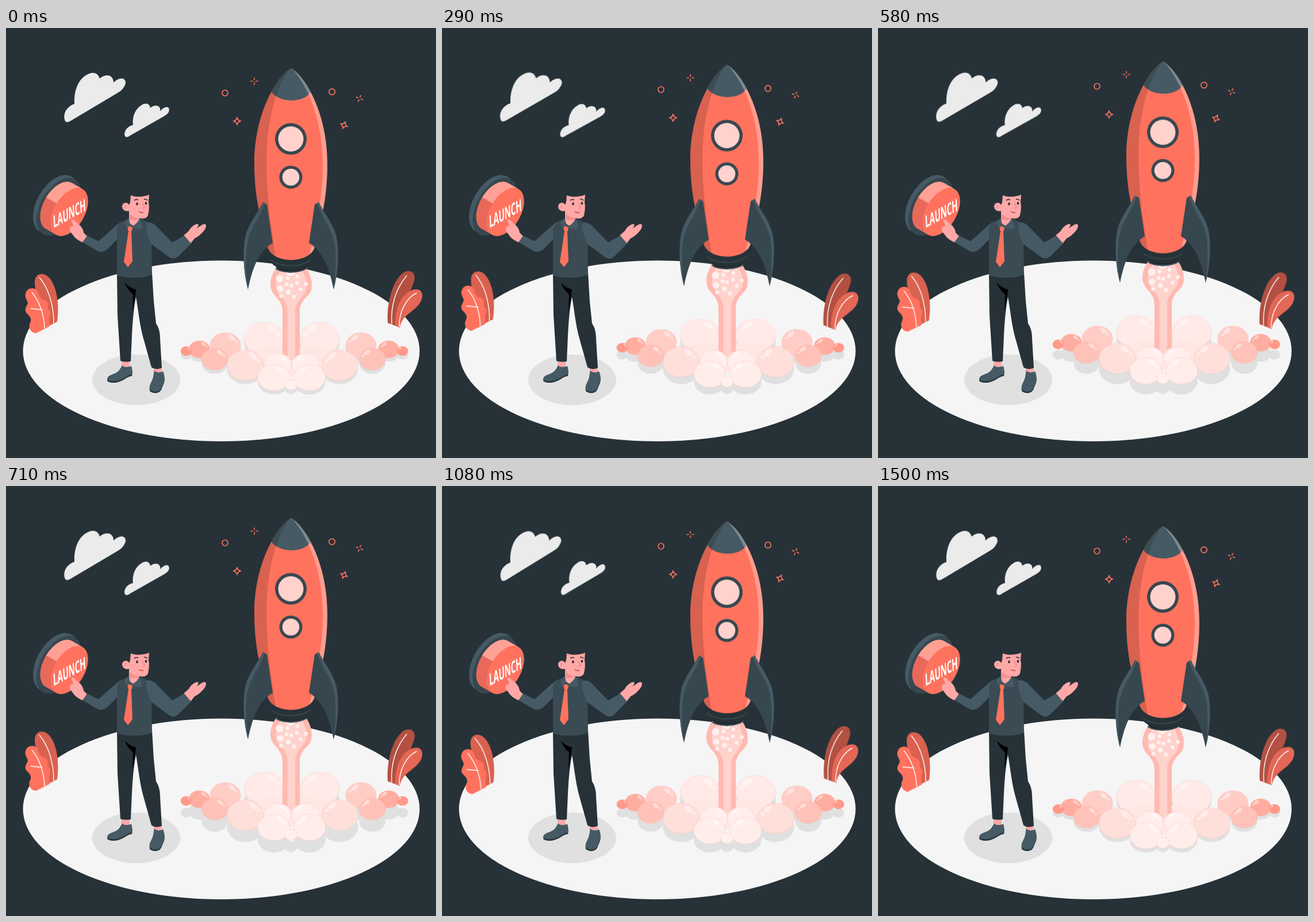
An HTML page that plays this animation: 748x748 px, repeating every 1540 ms.

```html
<!DOCTYPE html>
<html lang="en">
<head>
<meta charset="utf-8">
<title>Rocket launch</title>
<style>
  html, body { margin: 0; width: 100%; height: 100%; overflow: hidden; background: #263238; }
  svg { display: block; width: 100%; height: 100%; }
  .fly, .sway { animation: fly 1540ms -5ms infinite; }
  .sway { animation-name: sway; }
  .clouds { transform-origin: 193px 134px; }
  .plants { transform-origin: 379px 477px; }
  @keyframes fly {
    0% { transform: translateY(0); animation-timing-function: steps(18); }
    48.649% { transform: translateY(-14.96px); animation-timing-function: steps(18); }
    97.297%, 100% { transform: translateY(0); }
  }
  @keyframes sway {
    0% { transform: rotate(0deg); animation-timing-function: steps(9); }
    24.324% { transform: rotate(1deg); animation-timing-function: steps(18); }
    72.973% { transform: rotate(-1deg); animation-timing-function: steps(10); }
    100% { transform: rotate(0deg); }
  }
  .red { fill: #ff725e; }
  .skin { fill: #ffa8a7; }
  .slate { fill: #455a64; }
  .deep { fill: #37474f; }
  .dark { fill: #263238; }
  .line { fill: none; stroke: #ff725e; stroke-width: 1.7; stroke-linejoin: round; stroke-linecap: round; }
  .rib { fill: none; stroke: #fff; stroke-width: 1.4; stroke-linecap: round; }
  text { font: bold 29px "Open Sans", sans-serif; fill: #fff; }
</style>
</head>
<body>
<svg viewBox="0 0 748 748">
  <defs>
    <path id="body" d="M496 70C470 85 432 150 432 235C432 285 440 320 446 340L456 384C468 410 524 410 536 384L546 340C552 318 559 285 559 235C559 150 522 85 496 70Z"/>
    <clipPath id="hull"><use href="#body"/></clipPath>
    <path id="shoes" d="M202 587C206 591 213 590 218 588C220 594 220 599 219 603C212 603 206 610 199 612C190 616 178 615 176 611C176 604 186 603 191 600C197 597 199 592 202 587ZM258 596C262 600 269 600 273 597C276 604 277 611 274 617L270 627C266 634 255 634 250 629C248 621 255 614 256 607Z"/>
    <path id="spark" d="M0-5.500V-2.500M0 2.500V5.500M-6 0H-3M3 0H6"/>
    <path id="star" d="M0-6.500Q1-1 6.500 0Q1 1 0 6.500Q-1 1-6.500 0Q-1-1 0-6.500Z"/>
  </defs>
  <rect width="748" height="748" class="dark"/>
  <ellipse cx="374.5" cy="561.8" rx="345" ry="157.2" fill="#f5f5f5"/>
  <ellipse cx="226.5" cy="612" rx="76.5" ry="44" fill="#e0e0e0"/>
  <g id="shade" fill="#e0e0e0"></g>

  <g class="sway clouds" fill="#ebebeb">
    <path d="M103 162C100 156 101 147 106 141C110 136 115 133 119 132C118 112 124 90 141 81C152 75 160 78 163 88C168 83 176 81 182 84C186 87 187 91 187 95C192 90 198 87 203 88C209 90 209 96 206 101C203 107 199 110 194 113L115 160C109 164 105 165 103 162Z"/>
    <path d="M207 188C205 184 207 178 211 174C214 171 218 169 221 169C219 156 224 141 236 134C244 129 250 132 251 139C256 135 263 133 267 138C268 140 269 142 268 145C272 140 278 136 282 138C285 141 284 146 281 149C279 151 277 152 274 154L216 187C212 190 209 191 207 188Z"/>
  </g>

  <g class="sway plants">
    <path fill="#d9614f" d="M67 522C70 490 49 465 50 441C51 428 61 425 70 430C87 441 94 478 89 511Z"/>
    <path class="rib" d="M58 434C72 450 83 478 83 513"/>
    <path class="red" d="M52 531C44 530 39 524 41 515C46 506 42 502 36 496C30 489 37 484 38 478C36 471 31 468 35 459C39 451 51 451 55 458C57 467 60 471 66 473C75 476 72 483 73 489C81 495 75 501 75 507L76 519Z"/>
    <path class="rib" d="M45 460C57 474 66 496 67 522M43 488L63 490"/>
    <path fill="#b35042" d="M664 513C662 480 671 440 692 425C703 419 714 425 710 440C704 461 688 487 685 521Z"/>
    <path class="rib" d="M697 431C678 453 669 483 671 515"/>
    <path fill="#e56755" d="M685 521C690 494 720 492 724 468C726 455 714 451 702 458C685 467 677 490 677 517Z"/>
    <path class="rib" d="M714 461C696 470 684 493 684 519"/>
  </g>

  <g class="button">
    <ellipse class="slate" rx="32" ry="55" transform="translate(86 306) rotate(30)"/>
    <ellipse class="deep" rx="32" ry="55" transform="translate(92 311) rotate(30)"/>
    <g transform="translate(92 309.5) rotate(30)">
      <path fill="#e8695a" d="M0-46H21V46H0A26.7 46 0 0 1 0-46Z"/>
      <path fill="#ffa195" d="M0-46H21V-2H-26.7A26.7 46 0 0 1 0-46Z"/>
      <ellipse class="red" cx="21" rx="26.7" ry="46"/>
    </g>
    <text transform="matrix(.46 -.25 .05 1 82.5 348)">LAUNCH</text>
  </g>

  <g class="man">
    <path class="skin" d="M201 577H215V592H201ZM256 586H271V602H257Z"/>
    <use href="#shoes" class="dark" y="2.5"/>
    <use href="#shoes" class="slate"/>
    <path class="dark" d="M193 425H254L257 475L261 514C266 521 268 530 268 540L271 591C266 594 258 594 253 590L239 540C232 515 230 488 226 468C221 493 220 519 219 535L217 580C210 581 204 581 199 579L194 500Z"/>
    <path d="M207 443C212 449 218 452 226 455L224 472L220 494L221 463C214 458 209 450 207 443Z"/>
    <path class="skin" d="M141 362L135 356C134 349 131 345 126 341L118 334C115 332 112 334 115 338L117 344L112 346C109 350 111 354 115 358C120 366 125 369 133 373ZM309 361L318 353C321 347 328 341 333 341C337 342 333 347 331 349C336 346 341 341 346 341C350 343 347 350 344 353C339 359 333 364 328 366L321 375Z"/>
    <path class="slate" d="M207 336C200 336 195 341 190 345L161 371L141 361L134 373L159 388C165 391 171 389 176 385L198 363Z"/>
    <path fill="#3a4b54" d="M213 334C201 336 193 342 193 354V430C206 436 240 436 254 429L253 365L247 338L236 333Z"/>
    <path class="slate" d="M243 340C250 336 256 339 261 344L289 373L310 361L322 375L301 396C295 403 288 402 283 398L253 376C247 365 244 352 243 340Z"/>
    <path class="skin" d="M217 291C227 295 240 294 249 290L248 303C250 312 248 321 247 326C244 332 238 332 232 331V340C226 347 217 344 214 337V318C209 320 202 317 202 310C203 303 212 302 214 308L216 303Z"/>
    <path fill="#f28f8f" d="M215 323C220 328 226 331 232 331C227 335 220 335 215 333Z"/>
    <path class="slate" d="M214 331C215 339 217 344 214 353C209 348 206 341 206 336ZM232 331C235 335 237 341 237 349C230 351 222 348 217 346C224 343 230 338 232 331Z"/>
    <path class="red" d="M212 346C215 344 218 345 220 348L219 353C217 355 214 355 212 352ZM213 354H218L220 406L212 416L205 407Z"/>
    <g class="dark"><ellipse cx="228" cy="306" rx="1.8" ry="2.4"/><ellipse cx="243.5" cy="305" rx="1.8" ry="2.4"/></g>
    <path fill="none" stroke="#263238" stroke-width="1.6" d="M223 300Q226 297 230 299M240 298Q244 297 246 300"/>
    <path fill="none" stroke="#e27f80" stroke-width="1.2" d="M237 304L241 312Q240 314 237 313M207 308Q210 311 206 313"/>
    <path fill="none" stroke="#b53f42" stroke-width="1.3" d="M231 319Q235 322 239 321"/>
  </g>

  <g class="fly">
    <g class="line">
      <circle cx="381" cy="113" r="5"/>
      <circle cx="567" cy="111" r="5.2"/>
      <use href="#spark" transform="translate(432 92.5)"/>
      <use href="#spark" transform="translate(615 122.5) rotate(22)"/>
      <use href="#star" transform="translate(402 162)"/>
      <use href="#star" transform="translate(588 169) rotate(22)"/>
    </g>
    <g id="back"></g>
    <path fill="#ffb9b0" d="M472 415C462 426 457 445 462 456C466 468 480 472 481 492V578H511V492C512 472 527 468 531 456C534 445 530 426 520 415Z"/>
    <path fill="#ffd2cc" d="M482 418C469 430 467 448 472 459C477 468 489 474 489.5 492V578H503V492C504 474 518 467 522 456C525 444 520 426 512 418Z"/>
    <g id="bubbles" fill="#fff0ee"></g>
    <g id="front"></g>

    <path fill="#202b30" d="M468 410C468 431 525 431 526 409Z"/>
    <path class="dark" d="M459 393L462 409C474 424 519 424 529 409L531 393Z"/>
    <path fill="none" stroke="#37474f" stroke-width="2" d="M461 403C474 417 518 417 530 402M469 418C480 427 515 426 525 416"/>
    <use href="#body" class="red"/>
    <g clip-path="url(#hull)">
      <path class="slate" d="M440 60H550V111H530C519 131 474 131 461 110Z"/>
      <path fill-opacity=".15" d="M496 68C472 98 453 155 453 237C453 290 462 355 471 410H420V68Z"/>
      <path fill="#fff" fill-opacity=".3" d="M496 69C523 98 551 155 551 240C551 295 538 355 524 410H570V69Z"/>
    </g>
    <g class="deep">
      <circle cx="495.5" cy="193" r="27.5"/>
      <circle cx="495.5" cy="259.5" r="20"/>
    </g>
    <g fill="#ffd2cd">
      <circle cx="495.5" cy="193" r="22"/>
      <circle cx="495.5" cy="259.5" r="14.8"/>
    </g>
    <g id="fin">
      <path class="deep" d="M447 303L454 307L464 374C439 388 428 420 421 455C413 425 411 385 417 360C423 339 439 320 447 303Z"/>
      <path class="slate" d="M447 303L450 305C442 329 427 345 421 368C416 390 417 420 420 450C413 425 411 385 417 360C423 339 439 320 447 303Z"/>
    </g>
    <use href="#fin" transform="translate(991) scale(-1 1)"/>
  </g>
</svg>
<script>
  const MID = 496;
  const put = (id, html) => document.getElementById(id).innerHTML = html;
  const range = n => [...Array(n).keys()];
  const oval = (x, y, rx, ry, attrs = '') =>
    `<ellipse cx="${x}" cy="${y}" rx="${rx}" ry="${ry}" ${attrs}/>`;

  // Puffs on both sides of the exhaust; the right half spreads a little wider.
  const pair = (d, y, r) => [-1, 1].map(side => ({ side, d, x: MID + side * d + d * .03, y, r }));
  const back = range(4).flatMap(k =>
    pair(48 + 81.5 * k - 11.6 * k * k, 541 + 13 * k - 2 * k * k, 35 - 8.4 * k));
  const front = range(3).flatMap(k =>
    pair(31 + 49 * k + 2 * k * k, 608 - 27 * k + 5.5 * k * k, 28 + 10.5 * k - 6.5 * k * k)).reverse();
  const inner = pair(24, 586, 24);
  const tip = { side: 1, d: 0, x: MID, y: 621, r: 11 };

  // Puffs redden with distance from the exhaust.
  function puff({ side, d, x, y, r }) {
    const tone = `hsl(8 100% ${96.5 - 20 * (d / 190) ** 2}%)`;
    const shine = (u, v, w, h) => oval(0, 0, r * w, r * h,
      `fill="#fff" fill-opacity=".45" transform="translate(${x - side * r * u} ${y - r * v}) rotate(${-side * 38})"`);
    return oval(x, y, r, r * .83, `fill="${tone}" stroke="#ff9c8e" stroke-opacity=".3" stroke-width=".8"`)
      + shine(.4, .5, .26, .14) + shine(.7, .25, .1, .08);
  }

  const base = oval(MID, 580, 110, 26, 'fill="#ffe8e4"');
  const [outer, near] = [front.slice(0, 4), front.slice(4)];
  put('back', back.map(puff).join('') + base);
  put('front', [...outer, ...inner, ...near, tip].map(puff).join(''));
  put('shade', [...back, ...front, tip].map(p => oval(p.x, p.y + 6.5, p.r, p.r * .83)).join(''));

  // Bubbles on a golden-angle spiral, larger ones towards the rim.
  put('bubbles', range(13).map(i => {
    const a = i * 2.4 + 1, r = 8.2 * Math.sqrt(i);
    const size = i % 3 ? 3.4 : 3.6 + i * .32;
    return oval(MID + r * Math.cos(a), 448 + r * .85 * Math.sin(a), size, size);
  }).join(''));
</script>
</body>
</html>
```
